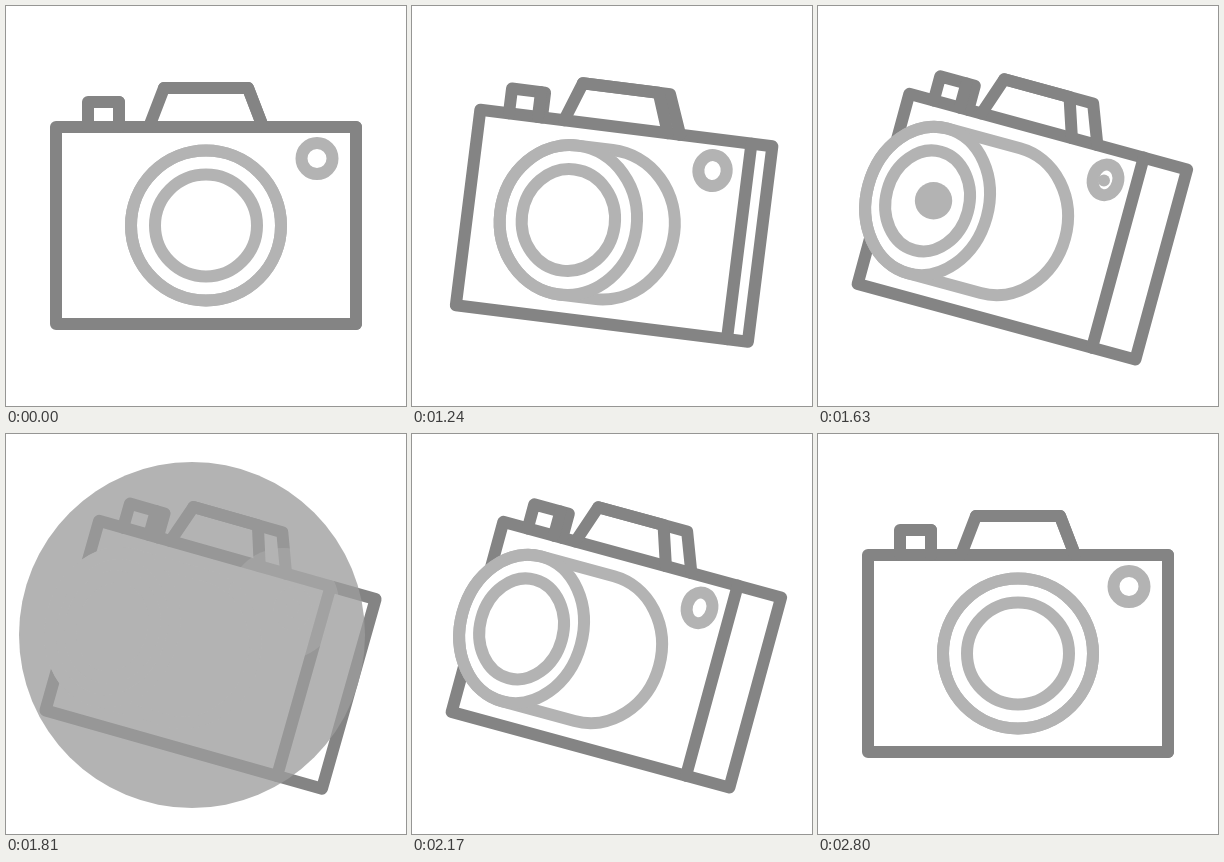
These frames come from a looping animation (400 px wide and 400 px high, 2.83 s). An HTML page with a canvas:

```html
<!DOCTYPE html>
<html lang="en">
<head>
<meta charset="utf-8">
<title>Camera</title>
<style>
  html, body { margin: 0; width: 100%; height: 100%; overflow: hidden; background: #fff; }
  canvas { display: block; width: 100vw; height: 100vh; }
</style>
</head>
<body>
<canvas id="stage" width="400" height="400"></canvas>
<script>
const ctx = document.getElementById('stage').getContext('2d');
const LOOP = 2830, REST = 1030, STEP = 30;
const DARK = '#848484', LIGHT = '#b3b3b3';
const TILT = 15.8 * Math.PI / 180;
const CX = 200, CY = 219.5;

const clamp = v => Math.min(1, Math.max(0, v));
const ramp = (t, from, to) => clamp((t - from) / (to - from));
const mix = (a, b, k) => a + (b - a) * k;
const bezier = (a, b, s) => 3 * a * s * (1 - s) ** 2 + 3 * b * s * s * (1 - s) + s ** 3;

// cubic-bezier(.25, .1, .25, 1)
function ease(x) {
  let lo = 0, hi = 1;
  for (let i = 0; i < 24; i++) {
    const mid = (lo + hi) / 2;
    if (bezier(0.25, 0.25, mid) < x) lo = mid; else hi = mid;
  }
  return x <= 0 ? 0 : x >= 1 ? 1 : bezier(0.1, 1, lo);
}

function line(points, closed) {
  ctx.beginPath();
  points.forEach(([x, y]) => ctx.lineTo(x, y));
  if (closed) ctx.closePath();
  ctx.stroke();
}

function ring(x, y, r, squeeze) {
  ctx.beginPath();
  ctx.ellipse(x, y, r * squeeze, r, 0, 0, Math.PI * 2);
  ctx.stroke();
}

function drawBody(p) {
  const left = -150 + 11 * p, right = 150 - 1.6 * p, edge = 150 - 48.3 * p;
  const top = -98.5, bottom = 98.5;
  ctx.strokeStyle = DARK;
  line([[left, top], [right, top], [right, bottom], [left, bottom]], true);
  line([[edge, top], [edge, bottom]]);

  // viewfinder hump
  const roof = -137.5;
  const a = [-42 - 10 * p, roof];
  line([[-57 - 8 * p, top], a, [42 - 1.6 * p, roof], [57 - 1.6 * p, top]]);
  line([a, [42 - 27 * p, roof], [57 - 29 * p, top]]);

  // shutter release
  const l = -118 + 4 * p, r = -87 + 9 * p, cap = -123.5;
  line([[l, top], [l, cap], [r, cap], [r, top]]);
  line([[-87, cap], [-87, top]]);
}

const lensX = p => -97.3 * p;

function barrel(p) {
  const front = lensX(p), base = -19 * p, q = Math.PI / 2;
  ctx.beginPath();
  ctx.ellipse(base, 0, 75 * (1 - 0.11 * p), 75, 0, -q, q);
  ctx.lineTo(front, 75);
  ctx.ellipse(front, 0, 75 * (1 - 0.19 * p), 75, 0, q, 3 * q);
  ctx.closePath();
}

function drawLens(p) {
  const front = lensX(p), squeeze = 1 - 0.19 * p;
  ctx.globalCompositeOperation = 'destination-out';
  barrel(p);
  ctx.fill();
  ctx.globalCompositeOperation = 'source-over';
  ctx.strokeStyle = LIGHT;
  barrel(p);
  ctx.stroke();
  ring(front, 0, 75, squeeze);
  ring(front, 0, 51, squeeze);
  ring(111 - 40 * p, -67, 15.5, squeeze);
}

function disc(x, y, r) {
  ctx.beginPath();
  ctx.arc(x, y, r, 0, Math.PI * 2);
  ctx.fill();
}

// Veils the drawn lines, and is solid where nothing is drawn.
function drawFlash(k) {
  const discs = [
    [mix(107, 186, k), mix(194, 201, k), 173 * k],
    [mix(287, 277, k), mix(175, 170, k), 56 * k]
  ];
  ctx.fillStyle = LIGHT;
  ctx.globalCompositeOperation = 'source-atop';
  ctx.globalAlpha = 0.4;
  discs.forEach(d => disc(...d));
  ctx.globalCompositeOperation = 'destination-over';
  ctx.globalAlpha = 1;
  discs.forEach(d => disc(...d));
  ctx.globalCompositeOperation = 'source-over';
}

function draw(t) {
  const p = ease(Math.min(ramp(t, 1024, 1824), 1 - ramp(t, 1976, 2776)));
  const grow = Math.min(ramp(t, 1620, 1800), 1 - ramp(t, 1980, 2100));
  const flash = 1 - (1 - grow) ** 2;

  ctx.clearRect(0, 0, 400, 400);
  ctx.save();
  ctx.translate(CX, CY);
  ctx.rotate(TILT * p);
  ctx.lineWidth = 12;
  ctx.lineJoin = ctx.lineCap = 'round';
  drawBody(p);
  drawLens(p);
  ctx.restore();
  if (flash > 0) drawFlash(flash);
}

const start = performance.now();
function tick() {
  const t = (performance.now() - start) % LOOP;
  draw(t < REST ? 0 : REST + Math.floor((t - REST) / STEP) * STEP);
  requestAnimationFrame(tick);
}
tick();
</script>
</body>
</html>
```
